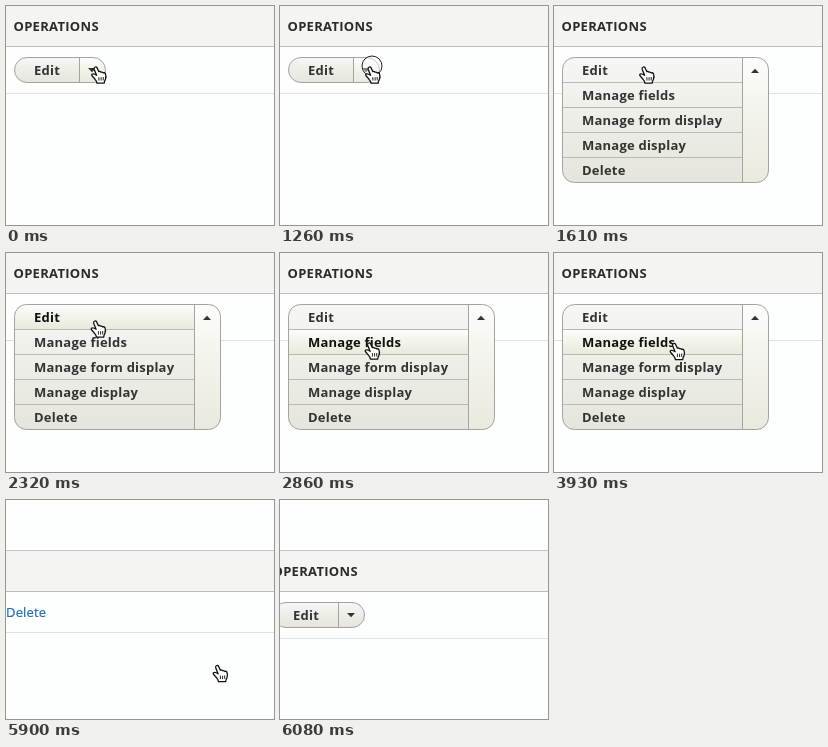
An HTML page that plays this animation: 268 px wide and 219 px high, repeating every 6630 ms.

```html
<!DOCTYPE html>
<html lang="en">
<head>
<meta charset="utf-8">
<title>Operations drop button</title>
<style>
  html, body { margin: 0; width: 100%; height: 100%; overflow: hidden; background: #fdfefe; }
  svg { display: block; width: 268px; height: 219px; }
  text { font: 700 13px "Open Sans", "Noto Sans", sans-serif; letter-spacing: .22px; fill: #333; }
  text.heading { letter-spacing: .3px; fill: #2b2b2b; }
  text.link { font-weight: 400; letter-spacing: .15px; fill: #1f69b3; stroke: #1f69b3; stroke-width: .2px; }
  .edge { fill: none; stroke: #a3a39f; }
  .rule { stroke: #b9b9b4; }
  .row rect { fill: none; }
  .row.hover rect { fill: url(#hover); }
  .row.hover text { fill: #111; }
</style>
</head>
<body>
<svg viewBox="0 0 268 219">
  <defs>
    <linearGradient id="face" x2="0" y2="1">
      <stop stop-color="#f6f6f3"/><stop offset="1" stop-color="#e5e5dd"/>
    </linearGradient>
    <linearGradient id="hover" x2="0" y2="1">
      <stop stop-color="#fcfcfa"/><stop offset="1" stop-color="#e9e9dd"/>
    </linearGradient>
    <linearGradient id="pressed" x2="0" y2="1">
      <stop stop-color="#e2e2da"/><stop offset="1" stop-color="#d9d9d0"/>
    </linearGradient>
    <clipPath id="menuShape"><rect x="8.5" y="51.5" width="206" height="125" rx="12"/></clipPath>
  </defs>

  <g id="page">
    <rect x="-20" width="320" height="40" fill="#f4f4f1"/>
    <path id="headTop" d="M-20-.5H300" stroke="#c4c4c0"/>
    <path d="M-20 40.5H300" stroke="#bdbdb9"/>
    <path id="rowLine" d="M-20 87.5H300" stroke="#e1e1df"/>
    <text class="heading" id="heading" x="7.5" y="25">OPERATIONS</text>

    <g id="button">
      <rect x="8.5" y="51.5" width="91" height="25" rx="12.5" fill="url(#face)"/>
      <path id="toggle" d="M73.5 51.5H87a12.5 12.5 0 0 1 0 25H73.5Z"/>
      <rect class="edge" x="8.5" y="51.5" width="91" height="25" rx="12.5"/>
      <path class="edge" d="M73.5 52V76"/>
      <path id="arrow" d="M82 62h8l-4 4.2Z" fill="#333"/>
      <text x="28" y="69">Edit</text>
    </g>

    <g id="menu">
      <rect x="8.5" y="51.5" width="206" height="125" rx="12" fill="url(#face)"/>
      <g clip-path="url(#menuShape)">
        <g id="rows"></g>
        <rect id="litToggle" x="188" y="52" width="27" height="125" fill="url(#hover)"/>
      </g>
      <path class="edge" d="M188.5 52V176"/>
      <rect class="edge" x="8.5" y="51.5" width="206" height="125" rx="12"/>
      <path d="M197 67h8l-4-4.2Z" fill="#333"/>
      <path id="underline" d="M28 95.5H120" stroke="#111"/>
    </g>
  </g>

  <text id="link" class="link" x="0" y="117">Delete</text>

  <g id="cursor">
    <circle id="ring" cx="7.5" cy="0" r="10" fill="#fff" fill-opacity=".4" stroke="#222"/>
    <g transform="scale(1.05 1)">
      <path d="M4.6 1Q3 1.6 3.5 3.2L5.8 9.3Q3.5 7.6 1.8 8Q.6 8.6 1.6 10Q4 12.6 5.5 15L6.2 17.2H13Q13.2 15 14.2 13.4Q15.3 10.5 14.2 7.6Q13.2 6.3 12.2 7Q11.2 5.6 9.9 6.2Q9 5 7.9 5.6L6.3 1.9Q5.7 .7 4.6 1Z"
        fill="#fff" stroke="#111" stroke-width="1.25" stroke-linejoin="round"/>
      <path d="M8 11.2v3.4M10.1 11.2v3.4M12.1 11v3.4" stroke="#111" stroke-width=".9"/>
    </g>
  </g>
</svg>
<script>
const $ = id => document.getElementById(id);
const LOOP = 6630;

$("rows").innerHTML = ["Edit", "Manage fields", "Manage form display", "Manage display", "Delete"]
  .map((label, i) => {
    const top = 52 + 25 * i;
    const rule = i < 4 ? `<path class="rule" d="M9 ${top + 24.5}H188"/>` : "";
    return `<g class="row"><rect x="9" y="${top}" width="179" height="24"/>${rule}` +
      `<text x="28" y="${top + 17}">${label}</text></g>`;
  }).join("");
const rows = [...document.querySelectorAll(".row")];

// Each step changes only the listed properties and keeps the rest.
const start = {
  view: "button", hand: [84.5, 60], ring: false, pressed: false,
  hover: -1, litToggle: true, underline: false,
};
const steps = [
  [1260, { ring: true }],
  [1430, { pressed: true }],
  [1610, { view: "menu", ring: false }],
  [2320, { hover: 0, hand: [84, 67] }],
  [2500, { hover: 1, hand: [84, 80] }],
  [2680, { hand: [84, 88.5] }],
  [2860, { hand: [84, 89] }],
  [3210, { hand: [111, 89] }],
  [3390, { hand: [112, 89] }],
  [3570, { hand: [95, 89.5] }],
  [3930, { hand: [115, 89.5] }],
  [4100, { hand: [115.5, 89.5] }],
  [4460, { ring: true, litToggle: false }],
  [4640, { ring: false, underline: true }],
  [5900, { view: "loading", hand: [206, 164.5] }],
  [6080, { view: "reloaded", hand: null, pressed: false }],
];

const show = (id, visible) => $(id).setAttribute("display", visible ? "inline" : "none");
const move = (id, x, y) => $(id).setAttribute("transform", `translate(${x} ${y})`);

function render(time) {
  const state = Object.assign({}, start, ...steps.filter(([at]) => at <= time).map(step => step[1]));
  const { view, hand, pressed } = state;
  const loading = view === "loading";
  const shifted = loading || view === "reloaded";

  move("page", shifted ? -15 : 0, shifted ? 51 : 0);
  move("rowLine", 0, loading ? -6 : 0);
  show("headTop", shifted);
  show("heading", !loading);
  show("link", loading);
  show("button", view === "button" || view === "reloaded");
  show("menu", view === "menu");

  $("toggle").setAttribute("fill", `url(#${pressed ? "pressed" : hand ? "hover" : "face"})`);
  show("arrow", !pressed);
  show("litToggle", state.litToggle);
  show("underline", state.underline);
  rows.forEach((row, i) => row.classList.toggle("hover", i === state.hover));

  show("cursor", hand);
  if (hand) move("cursor", ...hand);
  show("ring", state.ring);
}

const begin = performance.now();
function tick() {
  render((performance.now() - begin) % LOOP);
  requestAnimationFrame(tick);
}
tick();
</script>
</body>
</html>
```
